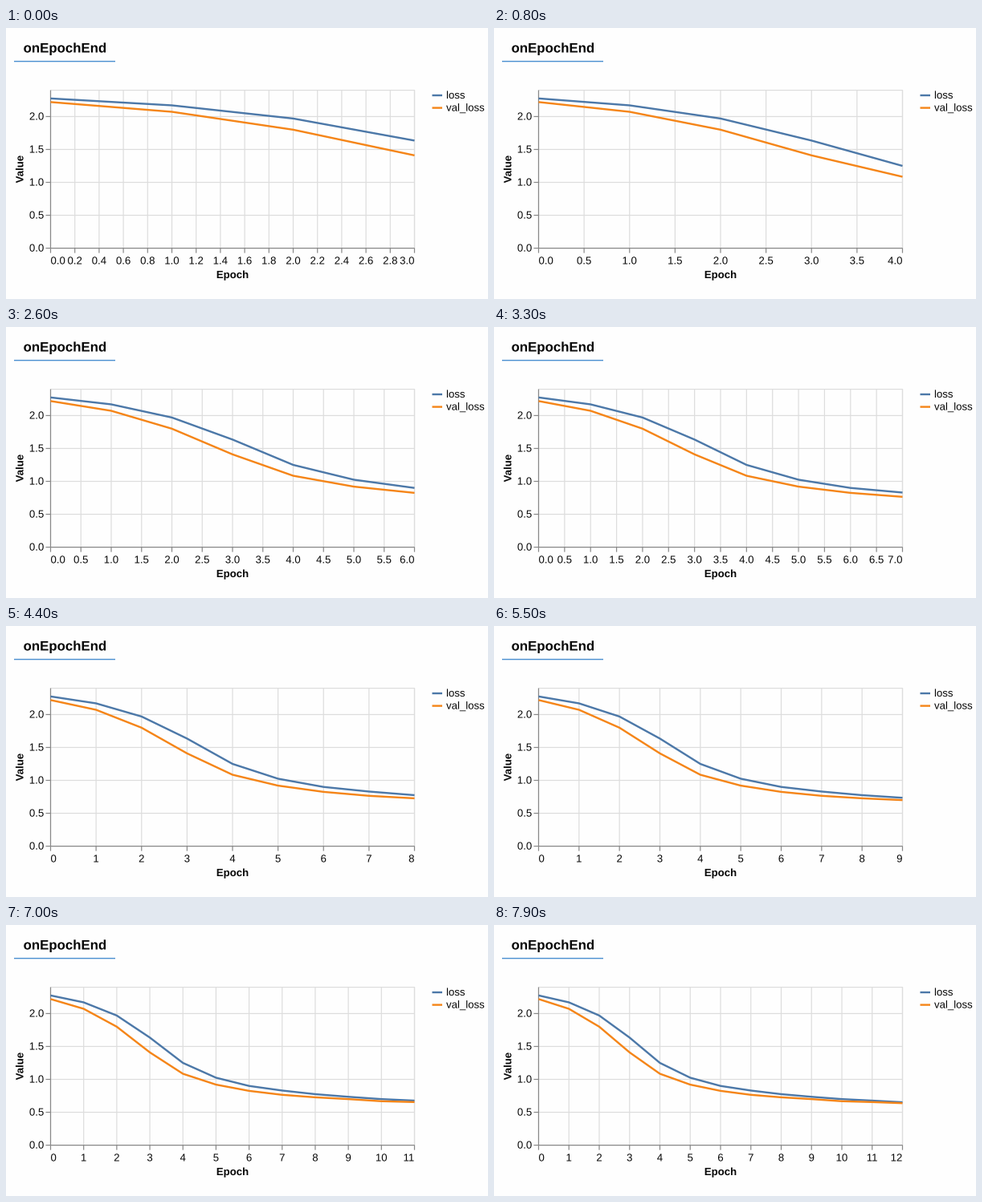
Animation of 600 by 338 pixels, one loop 8000 ms. Source, as a matplotlib script:

```python
import numpy as np
import matplotlib.pyplot as plt
from matplotlib.animation import FuncAnimation
from matplotlib.collections import LineCollection
from matplotlib.patheffects import Normal

W, H, DPI = 600, 338, 100
SCALE = 1.2  # stage pixels per chart unit
LEFT, RIGHT, TOP, BASE = 55.5, 508.5, 77.6, 274.6
UNIT = (BASE - TOP) / 2.4  # pixels per unit of value
STEP_MS, FRAMES = 100, 80

INK, GRID, AXIS = "#080808", "#dddddd", "#888888"
BLUE, ORANGE = "#4c78a8", "#f58518"
THIN, THICK = SCALE, 2 * SCALE
TICK = 5 * SCALE

LOSS = [2.275, 2.17, 1.97, 1.635, 1.25, 1.025, 0.90, 0.83, 0.775, 0.735,
        0.70, 0.677, 0.652]
VAL_LOSS = [2.22, 2.072, 1.80, 1.41, 1.085, 0.92, 0.825, 0.765, 0.727, 0.70,
            0.668, 0.655, 0.638]
FIRST_EPOCH = 3
EPOCH_TIMES = [700, 1600, 2400, 3300, 4100, 5000, 5800, 6700, 7400]

plt.rcParams["font.family"] = "Liberation Sans"
plt.rcParams["path.snap"] = False

fig = plt.figure(figsize=(W / DPI, H / DPI), dpi=DPI, facecolor="#fefefe")
ax = fig.add_axes([0, 0, 1, 1])
ax.set_xlim(0, W)
ax.set_ylim(H, 0)
ax.axis("off")


def pt(px):
    return px * 72 / DPI


def label(x, y, text, size=11, **kw):
    # Drawing as outlines keeps text at its exact subpixel position.
    return ax.text(x, y, text, fontsize=pt(size * SCALE), color=INK,
                   va="baseline", path_effects=[Normal()], **kw)


def stroke(xs, ys, color, width, z=2):
    return ax.plot(xs, ys, color=color, lw=pt(width), zorder=z,
                   solid_capstyle="butt", solid_joinstyle="miter")[0]


def ruling(color, z):
    rules = LineCollection([], colors=color, linewidths=pt(THIN), zorder=z)
    return ax.add_collection(rules, autolim=False)


def value_y(v):
    return BASE - UNIT * np.asarray(v)


def tick_step(span, count=10):
    """Nice step of 1, 2 or 5 times a power of ten."""
    raw = span / count
    power = 10 ** np.floor(np.log10(raw))
    ratio = raw / power
    limits = ((50 ** 0.5, 10), (10 ** 0.5, 5), (2 ** 0.5, 2))
    return power * next((m for limit, m in limits if ratio >= limit), 1)


# Heading
label(21.6, 30.5, "onEpochEnd", 14, weight="bold")
stroke([10, 136], [41.6, 41.6], "#4a8fd0", 1.4)

# Value axis and plot frame
for v in np.arange(0, 2.1, 0.5):
    y = value_y(v)
    stroke([LEFT, RIGHT], [y, y], GRID, THIN, 1)
    stroke([LEFT - TICK, LEFT], [y, y], AXIS, THIN, 3)
    label(47.3, y + 4.1, f"{v:.1f}", ha="right")
stroke([LEFT, RIGHT, RIGHT], [TOP, TOP, BASE], GRID, THIN, 1)
stroke([LEFT, LEFT], [TOP, BASE], AXIS, THIN, 3)
stroke([LEFT, RIGHT], [BASE, BASE], AXIS, THIN, 3)
label(21.5, 176, "Value", weight="bold", ha="center",
      rotation=90, rotation_mode="anchor")
label(282, 312, "Epoch", weight="bold", ha="center")

# Legend
for y, name, color in ((84, "loss", BLUE), (99.6, "val_loss", ORANGE)):
    stroke([530.5, 543], [y, y], color, THICK)
    label(548, y + 4, name)

# Parts that follow the number of epochs
grid = ruling(GRID, 1)
ticks = ruling(AXIS, 3)
tick_labels = [label(0, 294.5, "", ha="center") for _ in range(17)]
curves = [(stroke([], [], BLUE, THICK, 4), LOSS),
          (stroke([], [], ORANGE, THICK, 5), VAL_LOSS)]


def update(frame):
    now = frame * STEP_MS
    last = FIRST_EPOCH + sum(now >= t for t in EPOCH_TIMES)
    step = tick_step(last)
    marks = np.arange(0, last + step / 2, step)
    xs = LEFT + (RIGHT - LEFT) * marks / last

    grid.set_segments([[(x, TOP), (x, BASE)] for x in xs])
    ticks.set_segments([[(x, BASE), (x, BASE + TICK)] for x in xs])

    digits = 0 if step >= 1 else 1
    for i, text in enumerate(tick_labels):
        if i >= len(marks):
            text.set_text("")
            continue
        text.set_text(f"{marks[i]:.{digits}f}")
        text.set_x(xs[i])
        text.set_ha("left" if i == 0 else
                    "right" if i == len(marks) - 1 else "center")

    epochs = np.arange(last + 1)
    for line, data in curves:
        line.set_data(LEFT + (RIGHT - LEFT) * epochs / last,
                      value_y(data[:last + 1]))
    return [grid, ticks, *tick_labels, *(line for line, _ in curves)]


anim = FuncAnimation(fig, update, frames=FRAMES, interval=STEP_MS,
                     repeat=True, repeat_delay=0, blit=False)
plt.show()
```
